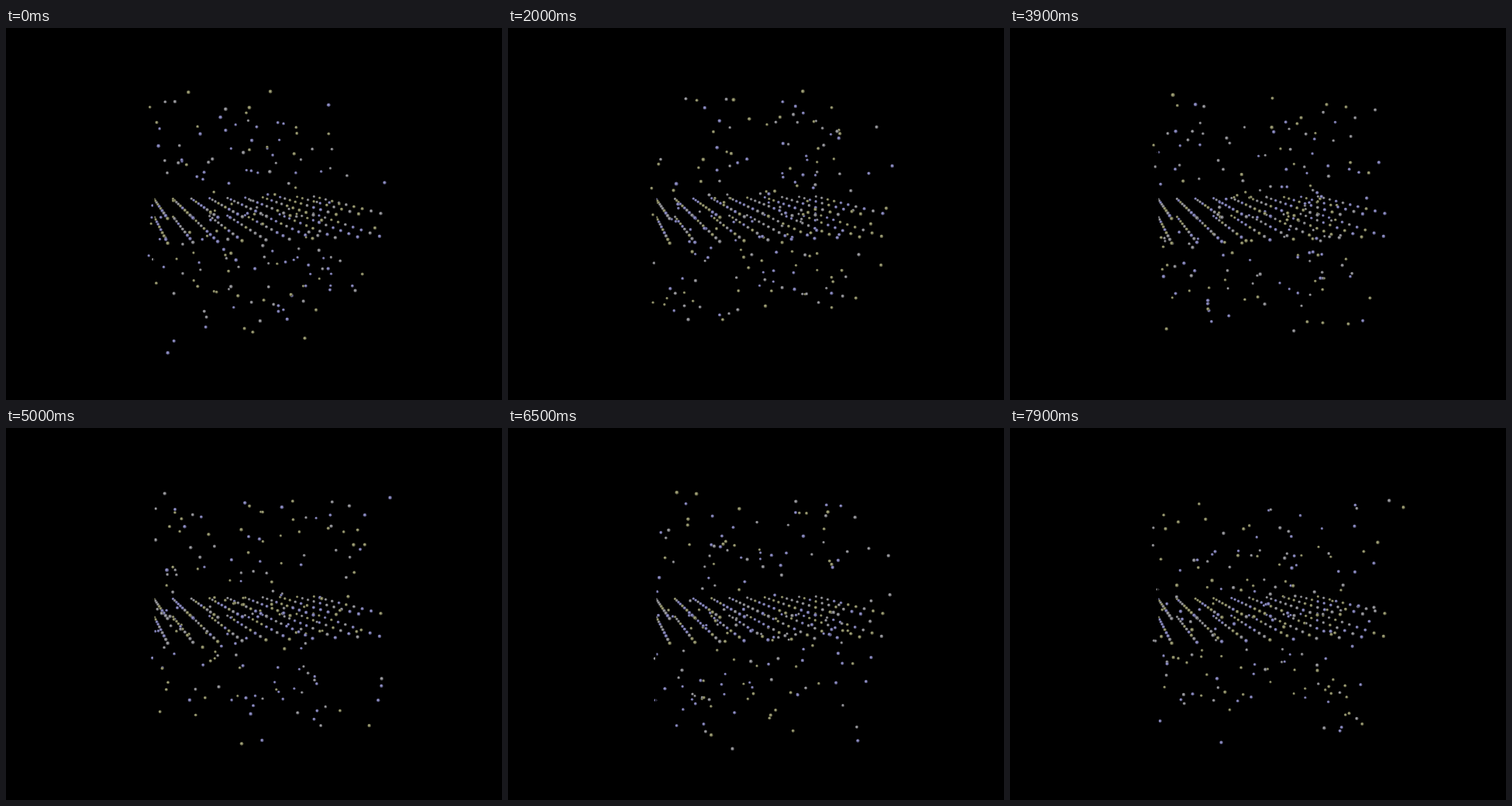
Animation of 640 by 480 pixels, one loop 8000 ms. Source, as an HTML page with a canvas:

```html
<!DOCTYPE html>
<html lang="en">
<head>
<meta charset="utf-8">
<title>Gas around a crystal slab</title>
<style>
  html, body { margin: 0; width: 100%; height: 100%; overflow: hidden; background: #000; }
  canvas { display: block; }
</style>
</head>
<body>
<canvas id="stage" width="640" height="480"></canvas>
<script>
const ctx = document.getElementById('stage').getContext('2d');
const LOOP = 8000, STEP = 100, GAS = 172;
const TONES = [
  ['#5c5c60', '#a0a0a4'],
  ['#56567c', '#9292c8'],
  ['#5c5c42', '#a2a278']
];

function seeded(seed) {
  return () => {
    seed = (seed + 0x6D2B79F5) | 0;
    let h = Math.imul(seed ^ (seed >>> 15), 1 | seed);
    h = (h + Math.imul(h ^ (h >>> 7), 61 | h)) ^ h;
    return ((h ^ (h >>> 14)) >>> 0) / 4294967296;
  };
}

// u: left to right, v: back to front, k: downwards in lattice layers
function project(u, v, k) {
  const w = 1 + 0.06 * u - 0.27 * v + 0.005 * k;
  return {
    x: (191 + 229.8 * u - 39.2 * v + 1.2 * k) / w,
    y: (220.5 + 9.5 * u - 41.4 * v + 24.6 * k) / w,
    w
  };
}

// Moves between two walls, turning back at each
function bounce(start, speed, n, low, high) {
  const p = (((start + speed * n) % 2) + 2) % 2;
  return low + (high - low) * (p > 1 ? 2 - p : p);
}

const lattice = [];
for (let k = 0; k < 2; k++)
  for (let j = 0; j < 10; j++)
    for (let i = 0; i < 10; i++) lattice.push(project(i / 9, j / 9, k));

const rnd = seeded(41);
const speed = () => (rnd() + rnd() + rnd() - 1.5) * 0.07;
const gas = Array.from({ length: GAS }, () => ({
  start: [rnd() * 2, rnd() * 2, rnd() * 2],
  speed: [speed(), speed(), speed()]
}));

function gasAt(n) {
  return gas.map(({ start: s, speed: d }) => project(
    bounce(s[0], d[0], n, -0.045, 1.045),
    bounce(s[1], d[1], n, -0.045, 1.045),
    bounce(s[2], d[2], n, -5.1, 5.8)
  ));
}

function disc(x, y, r, color) {
  ctx.fillStyle = color;
  ctx.beginPath();
  ctx.arc(x, y, r, 0, Math.PI * 2);
  ctx.fill();
}

function draw(n) {
  const pick = seeded(n * 977 + 5);
  ctx.fillStyle = '#000';
  ctx.fillRect(0, 0, 640, 480);
  const dots = lattice.concat(gasAt(n));
  for (const d of dots) d.tone = TONES[Math.floor(pick() * 3)];
  dots.sort((a, b) => b.w - a.w);
  for (const { x, y, w, tone } of dots) {
    const r = 1.8 / w;
    disc(x + 0.5, y + 0.5, r, tone[0]);
    disc(x + 0.3, y + 0.3, r * 0.6, tone[1]);
  }
  // Black front edges of the box hide what lies behind them
  ctx.fillStyle = '#000';
  ctx.fillRect(190, 75, 1.5, 360);
  ctx.fillRect(504, 75, 1.5, 345);
}

let shown = -1;
function tick(now) {
  const n = Math.floor((now % LOOP) / STEP);
  if (n !== shown) draw(shown = n);
  requestAnimationFrame(tick);
}
draw(0);
requestAnimationFrame(tick);
</script>
</body>
</html>
```
